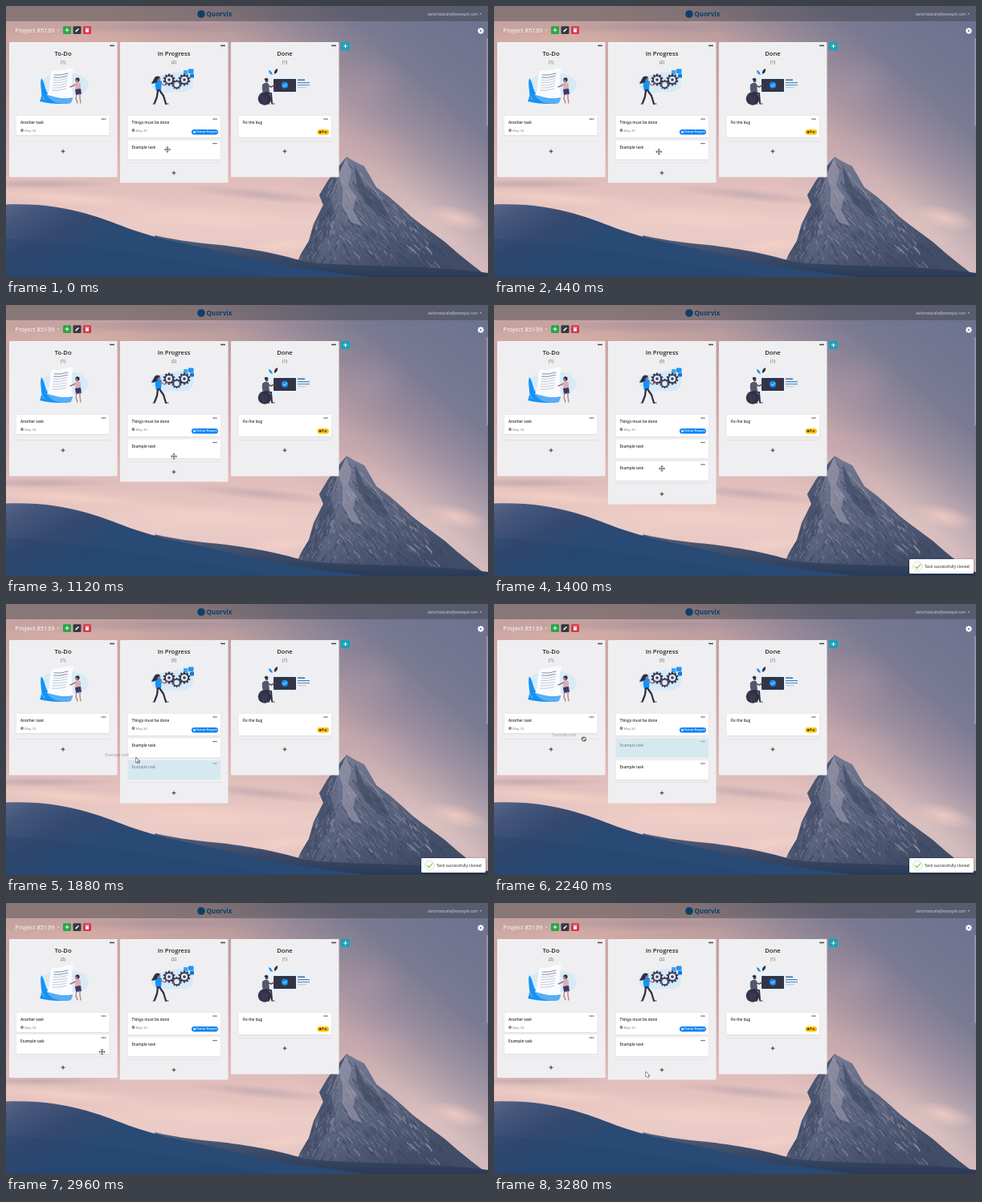
These frames come from a looping animation (600 px wide and 338 px high, 3.32 s). An HTML page with a canvas:

```html
<!DOCTYPE html>
<html lang="en">
<head>
<meta charset="utf-8">
<title>Task board</title>
<style>
html, body { margin: 0; width: 100%; height: 100%; overflow: hidden; background: #c5a7aa; }
canvas { display: block; width: 600px; height: 338px; }
</style>
</head>
<body>
<canvas id="stage"></canvas>
<script>
const W = 600, H = 338, LOOP = 3320;
const CLONE = 1160, GRAB = 1620, SWAP = 1930, ENTER = 2560, DROP = 2780;
const INK = '#2f2e41', BLUE = '#1592f5', SKIN = '#a8737a';
const FONT = '"Open Sans", "Noto Sans", sans-serif';
const dpr = window.devicePixelRatio || 1;
const stage = document.getElementById('stage');
const back = document.createElement('canvas');
for (const c of [stage, back]) { c.width = W * dpr; c.height = H * dpr; }
let g = back.getContext('2d');

const clamp = v => Math.max(0, Math.min(1, v));
const ramp = (t, a, b) => clamp((t - a) / (b - a));
const ease = v => v * v * (3 - 2 * v);
const mix = (a, b, v) => a + (b - a) * v;

function rect(x, y, w, h, fill, r = 0) {
  g.fillStyle = fill;
  g.beginPath();
  g.roundRect(x, y, w, h, r);
  g.fill();
}
function oval(x, y, rx, ry, fill, turn = 0) {
  g.fillStyle = fill;
  g.beginPath();
  g.ellipse(x, y, rx, ry, turn, 0, 7);
  g.fill();
}
function shape(d, fill) {
  g.fillStyle = fill;
  g.fill(new Path2D(d));
}
function stroke(d, color, w = 1) {
  g.strokeStyle = color;
  g.lineWidth = w;
  g.lineCap = g.lineJoin = 'round';
  g.stroke(new Path2D(d));
}
function text(s, x, y, size, color, weight = 400, align = 'left', style = '') {
  g.font = `${style} ${weight} ${size}px ${FONT}`;
  g.textAlign = align;
  g.textBaseline = 'alphabetic';
  g.fillStyle = color;
  g.fillText(s, x, y);
}
function shadow(color, blur, y = 0) {
  g.shadowColor = color;
  g.shadowBlur = blur * dpr;
  g.shadowOffsetY = y * dpr;
}
function fade(x0, y0, x1, y1, ...stops) {
  const f = g.createLinearGradient(x0, y0, x1, y1);
  stops.forEach(([at, c]) => f.addColorStop(at, c));
  return f;
}
function seeded(n) {
  return () => (n = (n * 16807) % 2147483647) / 2147483647;
}
function at(x, y, draw, scale = 1, turn = 0) {
  g.save();
  g.translate(x, y);
  g.rotate(turn);
  g.scale(scale, scale);
  draw();
  g.restore();
}

// Scenery
function cloud(x, y, rx, ry, rgb, alpha, turn = -0.1) {
  at(x, y, () => {
    g.scale(rx, ry);
    const f = g.createRadialGradient(0, 0, 0, 0, 0, 1);
    f.addColorStop(0, `rgba(${rgb},${alpha})`);
    f.addColorStop(1, `rgba(${rgb},0)`);
    oval(0, 0, 1, 1, f);
  }, 1, turn);
}
function sky() {
  rect(0, 0, W, H, fade(0, 0, 0, 320, [0, '#bf9f9d'], [0.14, '#cba6a2'],
    [0.45, '#d3aeae'], [0.72, '#e2c0bd'], [0.85, '#ecccc6'], [1, '#e6c6c4']));
  const slate = a => `rgba(106,113,143,${a})`;
  rect(0, 0, W, H, fade(600, 40, 400, 260, [0, slate(0.96)], [0.3, slate(0.85)],
    [0.5, slate(0.55)], [0.72, slate(0.15)], [1, slate(0)]));
  const peach = '246,210,198', mauve = '140,126,150';
  cloud(200, 26, 130, 9, mauve, 0.35, 0);
  cloud(80, 40, 120, 12, '222,178,170', 0.6, 0);
  cloud(450, 100, 50, 40, '176,152,168', 0.35, -0.4);
  cloud(440, 175, 70, 22, '196,164,174', 0.5, 0.1);
  cloud(80, 240, 130, 10, peach, 0.8, 0.08);
  cloud(40, 222, 100, 6, mauve, 0.3, 0);
  cloud(240, 262, 130, 14, peach, 0.7, 0.05);
  cloud(320, 236, 100, 8, mauve, 0.3, 0.1);
  cloud(560, 264, 40, 14, '246,205,196', 0.8, 0.25);
  cloud(345, 298, 50, 10, peach, 0.8, -0.1);
}
function mountain() {
  const peak = new Path2D('M424 188L434 194 446 200 453 212 461 226 477 238 493 252 506 264 519 274 546 294 562 308 578 321 600 338H352L361 322 368 308 377 293 383 272 395 248 390 236 400 219 410 205Z');
  g.save();
  g.clip(peak);
  rect(340, 180, 260, 160, fade(400, 195, 480, 338, [0, '#777b93'], [0.4, '#626a84'], [1, '#414c67']));
  shape('M424 188L413 212 404 238 410 262 394 296 382 330H345L384 235Z', '#4b5570');
  const rnd = seeded(417);
  for (let i = 0; i < 700; i++) {
    const y = 190 + 142 * Math.sqrt(rnd());
    const span = (y - 186) / 145;
    const x = 420 - 65 * span + 215 * span * rnd();
    const len = 2 + 7 * rnd(), lean = x < 415 ? -0.5 : 0.8;
    const lit = rnd() > 0.35 + 0.4 * span;
    const tone = lit ? (rnd() > 0.5 ? '#a3a1b2' : '#85879c') : (rnd() > 0.5 ? '#333f59' : '#434d67');
    g.globalAlpha = 0.3 + 0.4 * rnd();
    stroke(`M${x} ${y}l${len * lean} ${len * 0.8}l${3 * rnd() - 1} 2`, tone, 0.5 + rnd());
  }
  g.globalAlpha = 0.6;
  shape('M423 190L430 207 426 224 436 238 432 254 443 274 430 270 419 250 419 227 414 210Z', '#9c9aac');
  shape('M434 198L446 224 466 243 482 272 466 262 447 246 437 226Z', '#3b465f');
  g.restore();
}
function hills() {
  shape('M185 286C215 293 245 296 275 299C320 305 345 311 372 319C430 326 520 322 600 333V338H200Z',
    fade(0, 288, 0, 338, [0, '#515e7a'], [0.5, '#3a4967'], [1, '#2a3a56']));
  shape('M0 247.5C40 246 72 251 100 259C125 266 140 273 160 280C190 290 215 295 248 302C280 309 310 318 350 324C390 330 420 334 450 338H0Z',
    fade(0, 245, 50, 338, [0, '#59668a'], [0.25, '#44557a'], [0.6, '#34496f'], [1, '#284a74']));
  shape('M0 290C80 294 160 310 260 325L330 338H0Z', 'rgba(34,64,106,0.3)');
}
function plus(x, y, r, color, w) {
  stroke(`M${x - r} ${y}h${2 * r}M${x} ${y - r}v${2 * r}`, color, w);
}
function gear(x, y, r, color, hole, teeth = 8, inside = '#8d8b9d') {
  at(x, y, () => {
    for (let i = 0; i < teeth; i++) {
      g.rotate(2 * Math.PI / teeth);
      rect(-r * 0.2, -r * 1.25, r * 0.4, r * 0.5, color);
    }
    oval(0, 0, r, r, color);
    oval(0, 0, r * hole, r * hole, inside);
  });
}
function topBar() {
  rect(0, 0, W, 19, 'rgba(60,60,64,0.42)');
  oval(243, 10, 4.8, 4.8, '#0d3f6a');
  text('Quorvix', 249.5, 13, 8, '#0d3f6a', 700);
  text('belorrastudio@example.com', 587, 11.8, 4.9, '#d0ced4', 400, 'right', 'italic');
  shape('M589.6 9.3h2.6l-1.3 1.5z', '#d0ced4');
  text('Project 85139', 11.5, 33.3, 7.7, '#fff');
  shape('M63.5 29.5h3l-1.5 1.8z', 'rgba(255,255,255,.7)');
  ['#28a745', '#343a40', '#dc3545'].forEach((c, i) => rect(71 + 12.5 * i, 25.3, 10, 9.6, c, 1.2));
  plus(76, 30, 2, '#fff', 1);
  stroke('M87.1 31.6l2.9-2.9', '#fff', 1.5);
  rect(99, 28.8, 4, 4, '#fff', 0.5);
  rect(98.4, 27.5, 5.2, 0.8, '#fff');
  gear(591, 31, 3.2, '#fff', 0.4);
  rect(417, 45, 11, 10, '#17a2b8', 1);
  plus(422.5, 50, 2, '#fff', 1);
}

// Column pictures, each in stage coordinates
function writing() {
  shape('M43 98C44 88 58 83 72 84C88 82 102 88 103 98C103 108 92 112 78 111C62 114 42 110 43 98Z', '#d8eaf6');
  shape('M42 119C47 110 41 98 44 90C49 96 48 106 54 111L80 113 81 121C67 123 54 122 42 119Z', BLUE);
  shape('M58 80C66 83 74 76 84 78C80 90 83 102 83 114C72 117 62 114 51 111C57 102 52 90 58 80Z', '#f9fbff');
  shape('M51 111C62 114 72 117 83 114C83 119 80 122 76 122C64 122 55 119 51 111Z', '#59aef5');
  for (let i = 0; i < 7; i++)
    stroke(`M${60 - i * 0.4} ${86 + i * 3.2}q8 1 17-2`, i > 1 ? '#a9b4c5' : '#535b70', 0.7);
  stroke('M89 97L80 101', SKIN, 1.4);
  shape('M87 95q4-1 6 2l0 9-7 0z', '#dbaeb4');
  shape('M86 104l7-1 1 7-7 1z', '#3a3768');
  stroke('M88 110l-1 5 2 6M92 109l0 6 1 6', SKIN, 1.2);
  oval(89, 92, 2.6, 2.8, INK);
  oval(88, 93.2, 1.5, 1.6, SKIN);
  stroke('M48 117q-4-4-4-8', '#a9c9dc', 0.8);
}
function pushing() {
  shape('M180 97C178 86 196 87 206 84C218 79 234 84 233 95C234 106 222 109 210 107C196 110 181 107 180 97Z', '#d6eaf8');
  rect(221, 80, 5.5, 5.5, '#42a5f5', 0.7);
  rect(227, 78.5, 6.5, 5.5, '#2196f3', 0.7);
  rect(229, 84.5, 5, 5, '#0c7bd8', 0.7);
  for (const [x, y, r] of [[203, 92, 6], [222, 92, 6], [212.5, 98, 4.8]])
    gear(x, y, r, '#3f3d56', 0.68, 10, '#dfebf6');
  oval(203, 92, 1.8, 1.8, '#3f3d56');
  oval(222, 92, 1.8, 1.8, '#3f3d56');
  shape('M186 94q4-3 8 0l-1 11-6 1q-2-6-1-12z', BLUE);
  stroke('M192 96l5 3 4-2', SKIN, 1.4);
  stroke('M189 105l-1 8-3 8M191 105l5 7 3 10', INK, 2.2);
  stroke('M183 122h2M199 122h3', INK, 1.2);
  oval(190.5, 91, 2, 2.2, SKIN);
  shape('M192 88.5q-6-3-8 3l-3 5q7 1 8-5z', INK);
}
function sitting() {
  shape('M315 99C316 89 332 89 346 86C362 83 381 90 377 101C374 111 358 109 344 111C330 113 314 109 315 99Z', '#e9f0f7');
  rect(333, 91, 28, 16, '#343448', 0.8);
  oval(347, 98.8, 4, 4, BLUE);
  stroke('M345.2 98.8l1.4 1.4 2.5-2.7', '#fff', 0.8);
  rect(363, 91.5, 9, 1.4, '#555468');
  rect(363, 95, 15, 1.2, BLUE);
  rect(363, 98, 15, 1.2, '#8b8b9b');
  rect(363, 101, 11, 1.2, '#c8cbd5');
  shape('M332 86q-5-1-5-6q4 1 5 6z', BLUE);
  shape('M334 85q-1-5 4-7q1 5-4 7z', INK);
  oval(322, 115.5, 8.3, 8.3, '#34344a');
  stroke('M316 111q6 3 5 11M327 109q-6 6-1 12', '#4d4d66', 0.7);
  shape('M319 98q4-4 8-1l1 11-8 1q-2-6-1-11z', '#55596c');
  stroke('M326 99l4 2 4-2', '#6b4a50', 1.5);
  stroke('M323 108l7 1 1 12M321 109l6 3-1 9', INK, 2);
  stroke('M331 122h3M326 122h2', INK, 1.2);
  oval(324.5, 93, 2, 2.4, '#6b4a50');
  oval(324, 91.4, 2.2, 1.6, INK);
}

// Board
function dots(x, y, r = 0.75) {
  for (let i = -1; i < 2; i++) oval(x + i * 1.9, y, r, r, '#222');
}
function column(x, title, count, bottom, line, art) {
  rect(x, 45, 134.5, bottom - 45, '#efeff1', 1);
  dots(x + 128, 49.4, 0.85);
  text(title, x + 67, 61.8, 7.6, '#222', 600, 'center');
  text(`(${count})`, x + 67, 72, 5, '#444', 400, 'center');
  art();
  rect(x + 9, line, 117, 0.6, '#d9d9dd');
  plus(x + 67, line + 13.2, 2, '#222', 0.9);
}
function card(x, y, h, label, due, tag) {
  shadow('rgba(0,0,0,.13)', 1.5, 0.5);
  rect(x, y, 115.5, h, '#fff', 1.2);
  shadow('transparent', 0);
  text(label, x + 5, y + 10, 4.65, '#333', 600);
  dots(x + 108.5, y + 4, 0.65);
  if (due) {
    oval(x + 7, y + 18, 1.9, 1.9, '#777c88');
    stroke(`M${x + 7} ${y + 17}v1.1h.8`, '#fff', 0.4);
    text('May 30', x + 10, y + 19.6, 4.3, '#777c88');
  }
  if (tag) {
    const [name, w, fill, ink] = tag, left = x + 112.5 - w;
    rect(left, y + 16.9, w, 6.6, fill, 3.3);
    oval(left + 3.6, y + 20.2, 1.3, 1.3, ink);
    text(name, left + 5.8, y + 21.4, 3.3, ink, 600);
  }
}
function ghost(x, y) {
  rect(x, y, 115.5, 24, 'rgba(202,229,241,0.68)', 1.2);
  text('Example task', x + 5, y + 10, 4.65, 'rgba(60,75,90,.55)', 600);
  g.globalAlpha = 0.5;
  dots(x + 108.5, y + 4, 0.65);
  g.globalAlpha = 1;
}
function board(t) {
  const entered = t >= ENTER, dropped = t >= DROP;
  const three = t >= CLONE && !entered;
  const fly = 1 - (1 - ramp(t, ENTER, ENTER + 150)) ** 2.15;

  column(4, 'To-Do', dropped ? 2 : 1, entered ? 218 : 213.5, entered ? 192 : 168, writing);
  card(13, 137, 24, 'Another task', true);
  if (dropped) card(13, 164, 24, 'Example task');
  else if (entered) ghost(mix(152, 13, fly), mix(167.5, 163.5, fly));

  const count = t >= CLONE && !dropped ? 3 : 2;
  column(142, 'In Progress', count, three ? 248.5 : 220.5, three ? 222.5 : 195, pushing);
  card(151.5, 137, 27, 'Things must be done', true, ['Feature Request', 33, '#0b84f3', '#fff']);
  const swap = ease(ramp(t, SWAP, SWAP + 120));
  card(151.5, mix(167.5, 195, entered ? 1 - fly : swap), 24, 'Example task');
  if (three) {
    const y = mix(195, 167.5, swap);
    if (t >= GRAB) ghost(151.5, y);
    else card(151.5, y, 24, 'Example task');
  }

  column(280, 'Done', 1, 213.5, 168, sitting);
  card(289.5, 137, 27, 'Fix the bug', false, ['Bug', 14.5, '#ffc107', '#222']);
}
function toast(t) {
  const a = ramp(t, CLONE, CLONE + 120) * (1 - ramp(t, 2500, 2600));
  if (!a) return;
  g.globalAlpha = a;
  shadow('rgba(0,0,0,.4)', 3, 0.5);
  rect(517, 317, 80, 18, '#fff', 1.5);
  shadow('transparent', 0);
  g.strokeStyle = '#cfe3c0';
  g.lineWidth = 0.9;
  g.beginPath();
  g.arc(527.3, 326, 5.8, 0, 7);
  g.stroke();
  g.setLineDash([11 * ramp(t, CLONE + 60, CLONE + 220), 20]);
  stroke('M524.2 326.2l2.3 2.3 4.4-4.8', '#8fbf6c', 1.2);
  g.setLineDash([]);
  text('Task successfully cloned', 536, 327.8, 4.8, '#545454', 600);
  g.globalAlpha = 1;
}

// Pointer: time, x, y
const PATH = [[0, 201, 179], [300, 204, 181], [880, 209, 184.5], [1060, 209, 185], [1360, 209, 204],
  [1620, 209, 204], [1880, 163, 194], [2240, 112, 168.5], [2480, 90, 168], [2640, 84.5, 167],
  [2820, 82, 170], [3000, 130, 190], [3240, 190, 213], [LOOP, 190, 213]];
function pointer(t) {
  const i = PATH.findIndex(p => p[0] > t);
  const [a, b] = [PATH[i - 1], PATH[i]];
  const v = ramp(t, a[0], b[0]);
  return [mix(a[1], b[1], v), mix(a[2], b[2], v)];
}
function arrow() {
  const d = 'M-1-2v6l1.5-1.3 1 2.1 1-.4-1-2.1h1.9z';
  stroke(d, '#222', 0.9);
  shape(d, '#fff');
}
function cross() {
  const d = 'M-2.7 0h5.4M0-2.7v5.4M-1-2.5L0-3.6 1-2.5M-1 2.5L0 3.6 1 2.5M-2.5-1L-3.6 0-2.5 1M2.5-1L3.6 0 2.5 1';
  stroke(d, '#fff', 1.5);
  stroke(d, '#222', 0.7);
}
function denied() {
  oval(0, 0, 2.9, 2.9, '#fff');
  stroke('M-2.6 0a2.6 2.6 0 1 0 5.2 0a2.6 2.6 0 1 0-5.2 0M-1.8-1.8l3.6 3.6', '#222', 0.9);
}
function cursor(t) {
  const [x, y] = pointer(t);
  const held = t >= GRAB && t < DROP;
  if (held) text('Example task', x - 39.5, y - 3.8, 4.65, 'rgba(90,85,95,.4)', 600);
  let draw = arrow;
  if (t < GRAB || (t >= DROP && x < 128 && y < 188)) draw = cross;
  else if (held && x < 150 && t < ENTER - 60) draw = denied;
  at(x, y, () => {
    draw();
    if (held && draw === arrow) {
      rect(0.4, 1.8, 3, 2.5, '#222');
      rect(0.9, 2.3, 2, 1.5, '#fff');
    }
  });
}

g.scale(dpr, dpr);
sky();
mountain();
hills();
topBar();
g = stage.getContext('2d');

function frame(now) {
  const t = now % LOOP;
  g.setTransform(dpr, 0, 0, dpr, 0, 0);
  g.drawImage(back, 0, 0, W, H);
  rect(598, 40, 2, 110, 'rgba(215,210,220,.35)', 1);
  board(t);
  toast(t);
  cursor(t);
  requestAnimationFrame(frame);
}
requestAnimationFrame(frame);
</script>
</body>
</html>
```
